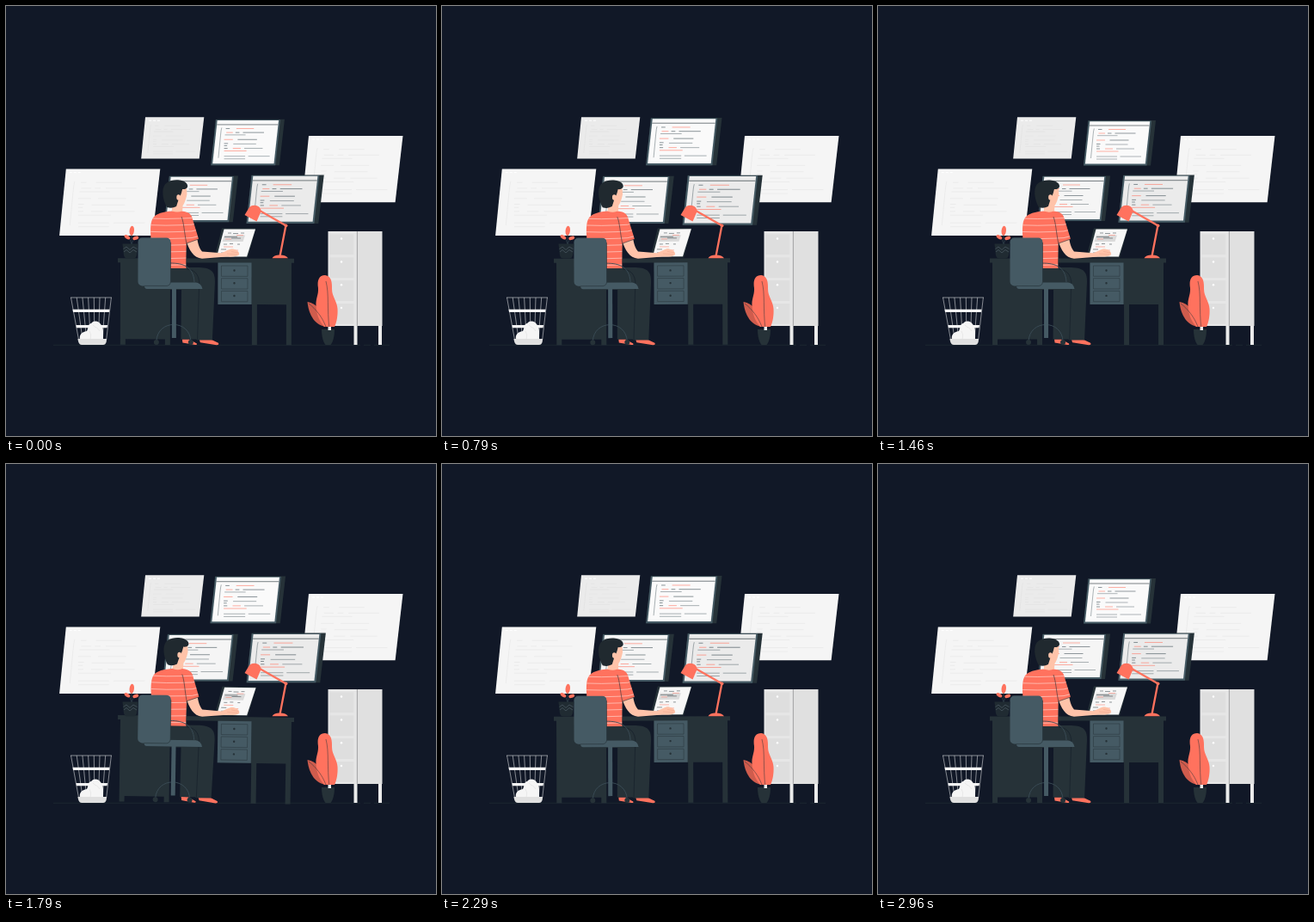
Recreate the animation shown at these times as an HTML page. Size 500 by 500 pixels, loop 3000 ms.

```html
<!DOCTYPE html>
<html lang="en">
<head>
<meta charset="utf-8">
<title>Programmer at a desk</title>
<style>
html, body { margin: 0; width: 100%; height: 100%; overflow: hidden; background: #111827; }
svg { display: block; width: 100vw; height: 100vh; }
.dark { fill: #263238; } .slate { fill: #455a64; } .red { fill: #ff725e; } .skin { fill: #ffc3a9; }
.line { fill: none; stroke: #263238; }
</style>
</head>
<body>
<svg viewBox="0 0 500 500">
  <defs>
    <clipPath id="torso"><path id="shirt" d="M168.500 271C167.500 258 168 249 172 245C177 240 187 239 197 238C208 238 214 240 216 245L224 271L210 276L209.500 305H170Z"/></clipPath>
  </defs>
  <path d="M55 394.300H412M416 394.300H424M428 394.300H446" class="line" stroke-width=".5"/>
  <g id="windows"></g>

  <g id="cabinet">
    <path d="M404.500 371H408.500V394H404.500ZM433 371H437V394H433ZM375 371H378V378H375Z" fill="#ebebeb"/>
    <path d="M374.500 262H408.500V372H374.500Z" fill="#e6e6e6"/>
    <path d="M408.500 262H437.500V372H408.500Z" fill="#e0e0e0"/>
    <path d="M408.300 262V372" stroke="#a6a6a6" stroke-width=".7"/>
  </g>
  <g id="leaves">
    <path d="M372.500 373C360 372 352 360 350.500 344C361 346 370 355 372.500 373Z" fill="#cf5c4d"/>
    <path class="red" d="M370 373C364 366 361 358 360.500 348C360 340 363.500 336 363 328C361.500 319 364 313 371 313C379 314 379 322 379 329C379 338 385 343 385.500 352C386 360 384.500 368 382 373Z"/>
    <path class="line" stroke-width=".5" d="M372 320C376 336 373 350 376 376M352 346C360 352 368 362 372 373"/>
    <path class="dark" d="M367 376H382C382 385 380 391 377.500 394H371.500C369 391 367 385 367 376Z"/>
    <path d="M374.500 373H378V377H374.500Z" fill="#ebebeb"/>
  </g>

  <g fill="#f5f5f5">
    <path id="wires" fill="none" stroke="#d5d7db" stroke-width=".6"/>
    <path d="M77.500 352.800H120.500L120 356H78ZM81.500 371H118L117.500 374.200H82Z"/>
    <path d="M86 388C85 382 88 379 94 378C96 374 95 370 99 369C102 365 108 366 110 370C114 373 113 382 113 388Z"/>
    <path d="M97 378C99 382 99 384 98 387M101 371C104 374 107 374 109 378" fill="none" stroke="#d8d8d8" stroke-width=".5"/>
    <path d="M83.500 387H117C117 391 116 394 113 394H88C85 394 84 391 83.500 387Z" fill="#e0e0e0"/>
  </g>

  <g id="screens"></g>

  <g id="desk">
    <path class="dark" d="M130 293.500H335V298.500H332V394H326V347H292V394H286V347H246.500V298.500H191V394H185V387.500H139V394H133V298.500H130Z"/>
    <path class="slate" d="M246.500 298.500H285.500V347H246.500Z"/>
    <g id="drawers"></g>
    <path class="dark" d="M251 258.500H290V260L281 292.500H242.500Z"/>
    <path d="M253.500 259.500H290L280 291.500H245Z" fill="#f7f7f7"/>
    <path d="M254 266.500H278L275.500 274H251.500Z" fill="#dadada"/>
    <path class="line" stroke-width=".5" d="M258 264H262M264 264.500H270M273 264H277M254 268.500H269M262 270H273M253 277H257M260 276.500H264M269 277H272M250 283H256M250 287H254"/>
    <path stroke="#ff725e" stroke-width=".5" d="M268 266.500H276M255 271H262M253 280H264M260 284H270"/>

    <g id="man">
      <path class="red" d="M205 387.500H213L222 392.500Q223 394 220 394L205.500 391.500ZM225 388H239L247 391.800Q248.500 394 245 394.200L226 391.300Z"/>
      <path class="dark" d="M175 304H222C238 304 243.500 308 243 321L240 388.500H222.500L221 387.500H203.500L204 330H175Z"/>
      <path d="M224.500 329L222.700 388M210 306C222 307 226 315 224.500 329" fill="none" stroke="#18222c" stroke-width=".8"/>
      <path class="skin" d="M209 272L222 268C223 277 225 282 228 285.500L250 287.300C256 285 260 282 264 282.500C269 283.500 272 286.500 271 289.300C268 291.800 262 291.800 256 291.500L228 293.700C218 293 213 284 209 272Z"/>
      <path d="M257 288L269 289M262 285.500L270 287" fill="none" stroke="#e59b83" stroke-width=".4"/>
      <path class="skin" d="M194 222L203 211L210 212.500L210.300 219Q208.500 228 205.500 232L205 238Q200 242 193 239Z"/>
      <use href="#shirt" class="red"/>
      <path id="stripes" clip-path="url(#torso)" fill="none" stroke="#ffe2dc" stroke-width=".6"/>
      <path class="line" stroke-width=".6" d="M204 245C207 253 207 262 209.800 276L224 271M210 276L209.500 304"/>
      <path class="skin" d="M193 233H205V238Q200 241 193 238.500Z"/>
      <path d="M187 234C181.500 224 180 210 187 205.500C193 201 206 201.500 210 206.500C212.500 210 210.500 213.500 205 213C204 216 204 219 201.500 222L198 233Q193 236 187 234Z" fill="#20292f"/>
      <ellipse class="skin" cx="200.500" cy="222.500" rx="2.300" ry="3.300"/>
    </g>

    <g id="chair">
      <path d="M191 299C206 299 218 303 219 321M175 390C176 364 214 364 215 390" fill="none" stroke="#3b4d57" stroke-width=".9"/>
      <path class="slate" d="M193 328H198V386H193Z"/>
      <circle class="dark" cx="175" cy="391" r="3"/><circle class="dark" cx="215" cy="391" r="3"/>
      <path class="slate" d="M161 321.500H221Q227 322 228.500 329H164Q161 329 161 325Z"/>
      <rect class="slate" x="153.500" y="269.500" width="38" height="56" rx="5"/>
      <path class="line" d="M161 325.500H187Q191.500 325 191.500 320V275" stroke-width=".6"/>
    </g>
  </g>

  <g id="pot">
    <path d="M146 277V264M146 277Q145 271 141 269M146 277Q147 272 151 270" fill="none" stroke="#3b4d57" stroke-width=".5"/>
    <ellipse class="red" cx="146.300" cy="261.300" rx="2.700" ry="5.600" transform="rotate(6 146 261)"/>
    <ellipse class="red" cx="140.800" cy="268.800" rx="3.700" ry="2" transform="rotate(32 141 269)"/>
    <ellipse class="red" cx="150.800" cy="269.800" rx="3.500" ry="2" transform="rotate(-18 151 270)"/>
    <path d="M135.500 276.500H153.500L152 290Q151 293.500 148 293.500H141Q138 293.500 137 290Z" fill="#202b32"/>
    <path d="M136.500 282.500L140 280L144 283.500L148 280L152.500 282.500M137 286L140 283.500L144 287L148 283.500L152 286" fill="none" stroke="#56666f" stroke-width=".6"/>
  </g>

  <g id="lamp">
    <path d="M318.500 291L325.400 255.300L292 236.300" fill="none" stroke="#ff725e" stroke-width="2.300" stroke-linejoin="round"/>
    <circle class="red" cx="325.500" cy="255.300" r="1.900"/>
    <path class="red" d="M277.500 243L283 234Q286 231 291 232Q296.500 233.500 296.500 239L291.500 250.500ZM309.500 293.300Q311 289.500 318.500 289.500Q326 289.500 328 293.300Z"/>
  </g>
</svg>

<script>
const el = id => document.getElementById(id);
const row = (y, ...spans) => spans.map(([a, b]) => `M${a} ${y}H${b}`).join('');

// Code on a screen, measured from its top left corner.
const dark = row(10.5, [11.5, 16]) + row(15, [22.5, 27], [31, 55]) + row(23, [25, 47]) +
  row(27.5, [9.5, 14]) + row(30, [9.5, 13]) + row(33, [9.5, 13.5]);
const gray = row(17.7, [10.5, 34]) + row(28, [20, 46]) + row(33, [32.5, 53.5]) +
  row(42, [9.5, 33.5], [37, 61.5]) + row(45, [9.5, 33.5]);
const red = row(10.5, [23.5, 43.5]) + row(15, [12, 19.5]) + row(23, [9.5, 19.5]) +
  row(33, [19.5, 28.5]) + row(36, [9.5, 35]);
const gutter = 'M6.800 9.500Q6 12 5.500 18L3 44';

const code = (ink, soft, accent) => `<g fill="none" stroke-width=".55">
  <path d="${dark}" stroke="${ink}"/>
  <path d="${gray}${gutter}" stroke="${soft}"/>
  <path d="${red}" stroke="${accent}"/></g>`;

const monitor = (x, y, scale, fill) => `<g transform="translate(${x} ${y}) scale(${scale})">
  <path class="dark" d="M0 0H78.500L72.500 52.500H-5.500Z"/>
  <path class="slate" d="M0 .5H73.500L68 52.500H-5.500Z"/>
  <path d="M1.800 1.200H71.700L66.300 50.500H-3.600Z" fill="${fill}"/>
  <path d="M1.300 6H71" class="line" stroke-width=".6"/>
  ${code('#37474f', '#6b787e', '#ff725e')}</g>`;

const panel = (x, y, w, h, scale, fill, ink) => `<g transform="translate(${x} ${y})">
  <path d="M0 0H${w}l${-h * .115} ${h}H${-h * .1}Z" fill="${fill}"/>
  <path d="M4 4H7M9 4H12M14 4H17" stroke="#fff" stroke-width="1"/>
  <g transform="scale(${scale})">${code(ink, ink, ink)}</g></g>`;

el('windows').innerHTML =
  panel(162, 129.2, 68.3, 48.4, .95, '#ebebeb', '#dedede') +
  panel(69.8, 189.6, 109.5, 77.3, 1.49, '#f5f5f5', '#e9e9e9') +
  panel(352, 151, 109.5, 77.2, 1.49, '#f5f5f5', '#e9e9e9');

el('screens').innerHTML =
  monitor(244.5, 133, 1, '#fafafa') +
  monitor(191.5, 197.5, 1, '#f5f5f5') +
  monitor(285.2, 196.4, 1.053, '#ebebeb');

el('cabinet').innerHTML += [265.5, 292.5, 319.2, 346].map(y =>
  `<rect x="376.500" y="${y}" width="27.800" height="23.700" fill="#dedede"/>
   <circle cx="390" cy="${y + 5}" r="1.200" fill="#fff"/>`).join('');

el('drawers').innerHTML = [302, 316.7, 331.4].map(y =>
  `<rect class="line" x="250.500" y="${y}" width="30.500" height="12.300" stroke-width=".5"/>
   <circle class="dark" cx="265.500" cy="${y + 5.5}" r="1.200"/>`).join('');

let wires = 'M75 339H123';
for (let i = 0; i < 8; i++) wires += `M${75.5 + i * 6.7} 339L${84.5 + i * 4.6} 388`;
el('wires').setAttribute('d', wires);

let stripes = '';
for (let y = 247; y < 305; y += 7.7) stripes += `M165 ${y}Q186 ${y + 1} 206 ${y}Q216 ${y + .5} 226 ${y - 3}`;
el('stripes').setAttribute('d', stripes);

// Linear interpolation through [position, value] stops.
function track(stops, p) {
  const i = Math.max(1, stops.findIndex(s => s[0] >= p));
  const [a, u] = stops[i - 1], [b, v] = stops[i];
  return u + (v - u) * (p - a) / (b - a);
}
const beat = [[0, 1], [.1, 1.1], [.3, 1], [.4, 1], [.5, 1.1], [.6, 1], [1, 1]];
const sway = [[0, 0], [.25, 1], [.75, -1], [1, 0]];
const step = 1000 / 24, period = 1500, lead = 30;

function draw(time) {
  const t = Math.floor((time % 3000 + 4) / step) * step;
  const p = (t + lead) % period / period;
  el('screens').setAttribute('transform',
    `translate(275 192) scale(${track(beat, p)}) translate(-275 -192)`);
  el('desk').setAttribute('transform', `rotate(${track(sway, p)} 232.5 298)`);
}

const start = performance.now();
function tick() {
  draw(performance.now() - start);
  requestAnimationFrame(tick);
}
tick();
</script>
</body>
</html>
```
